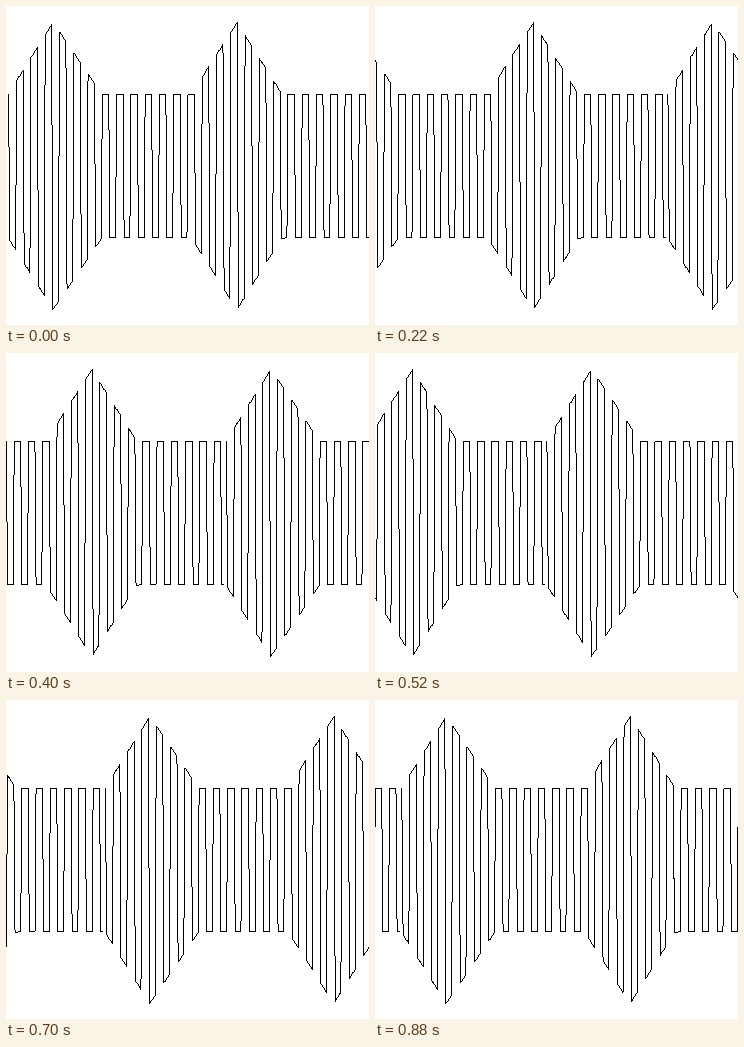
Write an HTML page with a canvas that moves like this. It is 363x319 px and loops after 940 ms.

```html
<!DOCTYPE html>
<html lang="en">
<head>
<meta charset="utf-8">
<title>Scrolling wave</title>
<style>
  html, body { margin: 0; width: 100%; height: 100%; overflow: hidden; background: #fff; }
  canvas { display: block; }
</style>
</head>
<body>
<canvas id="stage" width="363" height="319"></canvas>
<script>
const WIDTH = 363, HEIGHT = 319;
const STEPS = 15, HOLD = 100, STEP = 60;
const LOOP = HOLD + STEP * (STEPS - 1);
const TOP = 88, BOTTOM = 231, SWELL = 72;
const CAPS = 51, PITCH = 7.14;

const bursts = [
  { start: 2, peak: 46.5, end: 95, rise: 1.6, fall: 1.47 },
  { start: 188.5, peak: 230.5, end: 276, rise: 1.57, fall: 1.6 }
];

const ctx = document.getElementById("stage").getContext("2d");

// Extra height of the wave at x: a tent over each burst, flat elsewhere.
function swell(x) {
  const b = bursts.find(b => x >= b.start && x <= b.end);
  if (!b) return 0;
  const drop = x < b.peak ? (b.peak - x) * b.rise : (x - b.peak) * b.fall;
  return Math.max(0, SWELL - drop);
}

// Caps alternate between the lower and the upper edge.
function wavePoints() {
  const points = [{ x: 2, y: TOP }];
  for (let i = 0; i < CAPS; i++) {
    const upper = i % 2 === 1;
    const x = 3 + PITCH * i + (upper ? 0 : 0.4);
    const end = Math.min(x + (upper ? 6.4 : 5.7), WIDTH - 0.6);
    for (const px of [x, end]) {
      points.push({ x: px, y: upper ? TOP - swell(px) : BOTTOM + swell(px) });
    }
  }
  return points;
}

// One-pixel line without smoothing.
function line(a, b, offset) {
  const dx = b.x - a.x, dy = b.y - a.y;
  const n = Math.max(1, Math.ceil(Math.max(Math.abs(dx), Math.abs(dy))));
  for (let i = 0; i <= n; i++) {
    const x = a.x + dx * i / n + offset;
    const y = a.y + dy * i / n;
    ctx.fillRect(Math.round(x), Math.round(y), 1, 1);
  }
}

const wave = wavePoints();
let shown = -1;

function draw(time) {
  const t = time % LOOP;
  const step = t < HOLD ? 0 : 1 + Math.floor((t - HOLD) / STEP);
  if (step === shown) return;
  shown = step;
  const shift = WIDTH * step / STEPS;
  ctx.fillStyle = "#fff";
  ctx.fillRect(0, 0, WIDTH, HEIGHT);
  ctx.fillStyle = "#000";
  for (const offset of [-shift, WIDTH - shift]) {
    for (let i = 1; i < wave.length; i++) line(wave[i - 1], wave[i], offset);
  }
}

let origin = null;
function tick(now) {
  if (origin === null) origin = now;
  draw(now - origin);
  requestAnimationFrame(tick);
}
draw(0);
requestAnimationFrame(tick);
</script>
</body>
</html>
```
